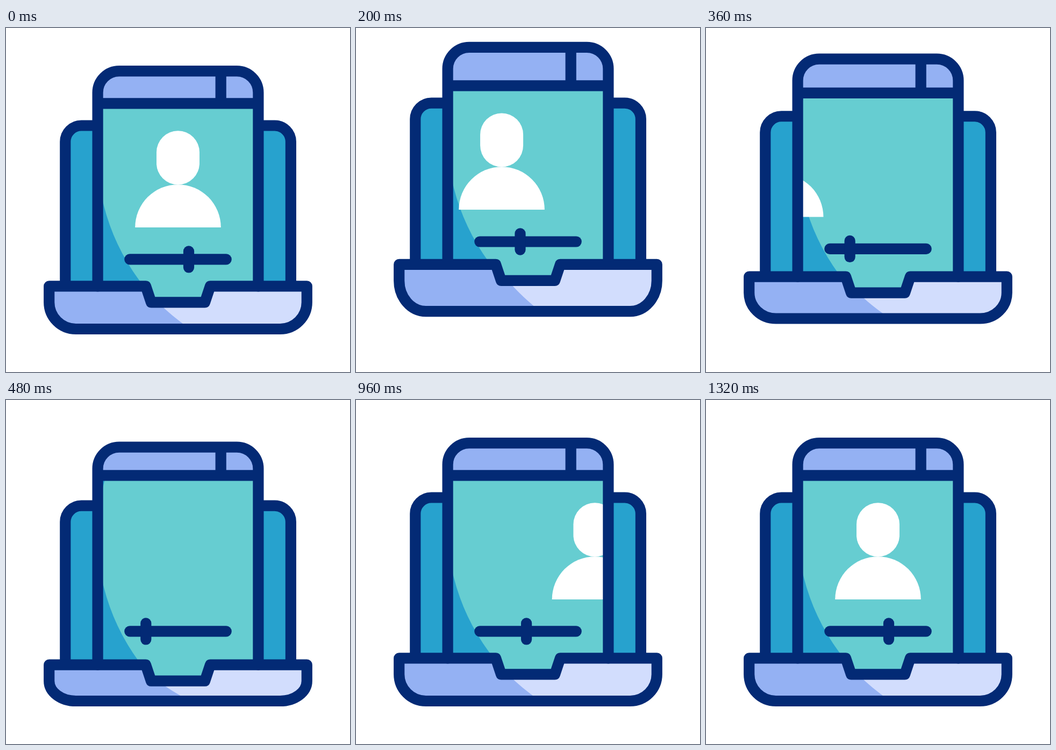
Recreate the animation shown at these times as an HTML page. Size 640x640 px, loop 1480 ms.

```html
<!DOCTYPE html>
<html lang="en">
<head>
<meta charset="utf-8">
<title>Laptop slider</title>
<style>
  html, body { margin: 0; width: 100%; height: 100%; overflow: hidden; background: #fff; }
  svg { display: block; width: 100%; height: 100%; }
  .line { fill: none; stroke: #032a75; stroke-width: 20.2; stroke-linecap: round; stroke-linejoin: round; }
</style>
</head>
<body>
<svg viewBox="0 0 640 640">
  <defs>
    <clipPath id="screen"><rect id="screenBox" x="170.5" y="140" width="299" height="365"/></clipPath>
  </defs>
  <g id="device">
    <path id="back" fill="#27a2ce"/>
    <path id="backLine" class="line"/>
    <rect x="170.5" y="140" width="299" height="350" fill="#27a2ce"/>
    <g clip-path="url(#screen)">
      <circle id="shine" cx="564" cy="234" r="394" fill="#66cdd1"/>
      <g id="person" fill="#fff">
        <rect x="280" y="191.3" width="80" height="100.2" rx="40"/>
        <path d="M240.2 371A79.8 79.8 0 0 1 399.8 371Z"/>
      </g>
    </g>
    <path id="top" fill="#94b1f3"/>
    <path id="base" fill="#d2ddfd"/>
    <path id="baseDark" fill="#94b1f3"/>
    <path id="windowLine" class="line"/>
    <path id="baseLine" class="line"/>
    <path class="line" d="M230.3 430.4H409.7"/>
    <path id="knob" class="line" d="M340 415.3V445.5"/>
  </g>
</svg>
<script>
const LOOP = 1480, STEP = 40;
const $ = id => document.getElementById(id);
const setPath = (id, d) => $(id).setAttribute('d', d);
const move = (id, x, y) => $(id).setAttribute('transform', `translate(${x} ${y})`);

// Cubic bezier easing with control points (a, 0) and (b, 1).
function ease(x, a, b) {
  let lo = 0, hi = 1, u = 0.5;
  for (let i = 0; i < 24; i++) {
    u = (lo + hi) / 2;
    const v = 1 - u;
    if (3 * v * v * u * a + 3 * v * u * u * b + u * u * u < x) lo = u; else hi = u;
  }
  return u * u * (3 - 2 * u);
}

// Each key: [start, end, from, to, a, b]; values hold between keys.
function track(keys, t) {
  let value = keys[0][2];
  for (const [start, end, from, to, a = 1 / 3, b = 2 / 3] of keys) {
    if (t < start) break;
    value = from + (to - from) * ease(Math.min(1, (t - start) / (end - start)), a, b);
  }
  return value;
}

// Rest, stretch in the air, squash on landing, rest.
const bounce = (stretch, squash) => [
  [80, 240, 0, stretch], [240, 480, stretch, squash], [480, 600, squash, 0]
];

const tracks = {
  jump: bounce(-39, 0),
  win: bounce(-13.6, 7.5),
  back: bounce(-10.7, 15.2),
  base: bounce(-8.9, 12.4),
  shine: bounce(0, 18),
  knob: [[0, 480, 0, -79.7, 0.39, 0.485], [480, 1320, -79.7, 0, 0.404, 0.46]],
  person: [[80, 480, 0, -220, 0.36, 0.58], [677, 1325, 220, 0, 0.4, 0.53]]
};

function draw(t) {
  const p = {};
  for (const name in tracks) p[name] = track(tracks[name], t);

  move('device', 0, p.jump);
  move('person', p.person, 0);
  move('knob', p.knob, 0);
  move('shine', 0, p.shine);

  const floor = 480.3 + p.base, notch = floor + 30, bottom = 560;
  $('screenBox').setAttribute('height', notch - 145);

  const roof = 181.5 + p.back;
  const left = `M110.3 ${floor}V${roof + 30}A30 30 0 0 1 140.3 ${roof}H`;
  const right = `H499.9A30 30 0 0 1 529.9 ${roof + 30}V${floor}`;
  setPath('back', `${left}170${right}Z`);
  setPath('backLine', `${left}170M470 ${roof}${right}`);

  const head = 80.2 + p.win;
  const arch = `V${head + 40}A40 40 0 0 1 210.6 ${head}H429.4A40 40 0 0 1 469.4 ${head + 40}V`;
  setPath('top', `M170.6 140.3${arch}140.3Z`);
  setPath('windowLine', `M170.6 ${floor}${arch}${floor}M170.6 140.3H469.4M399.7 ${head}V140.3`);

  const ry = bottom - notch;
  const lip = `M80.2 ${floor}H260L270 ${notch}H`;
  const heel = `H130A49.8 ${ry} 0 0 1 80.2 ${notch}Z`;
  const hull = `${lip}370L380 ${floor}H559.8V${notch}A49.8 ${ry} 0 0 1 510 ${bottom}${heel}`;
  setPath('base', hull);
  setPath('baseLine', hull);
  setPath('baseDark', `${lip}282.8Q306.9 ${535 + p.base / 2} 342.7 ${bottom}${heel}`);
}

let origin = null;
function frame(now) {
  if (origin === null) origin = now;
  draw(Math.floor(((now - origin) % LOOP) / STEP) * STEP);
  requestAnimationFrame(frame);
}
draw(0);
requestAnimationFrame(frame);
</script>
</body>
</html>
```
